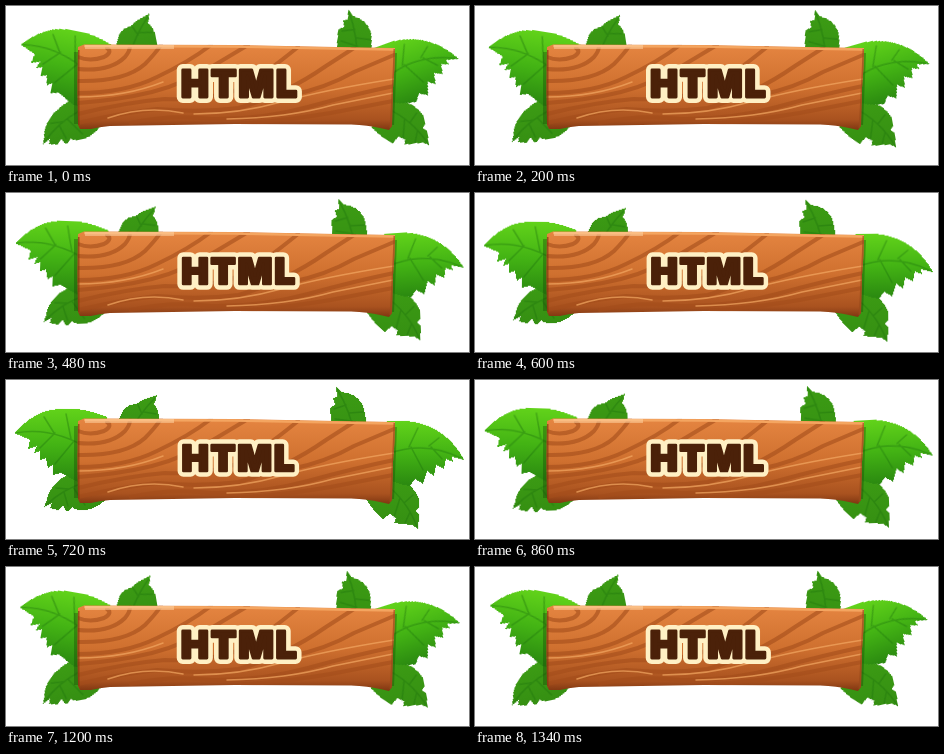
These frames come from a looping animation (463 by 159 pixels, 1360 ms). An HTML page:

```html
<!DOCTYPE html>
<html lang="en">
<head>
<meta charset="utf-8">
<title>HTML sign</title>
<style>
html, body { margin: 0; width: 100%; height: 100%; overflow: hidden; background: #fff; }
svg { display: block; width: 463px; height: 159px; }
.vein { fill: none; stroke: #1d700d; stroke-width: 1.5; stroke-linecap: round; opacity: .4; }
.band, .glow { fill: none; stroke-linecap: round; }
.band { stroke: #a34e1b; stroke-width: 4; opacity: .6; }
.glow { stroke: #f3a863; stroke-width: 1.5; opacity: .7; }
.edge { fill: none; stroke: #173f08; stroke-width: 6; opacity: .35; }
.label { font: 900 37px Inter, "Open Sans", sans-serif; letter-spacing: 2.2px; text-anchor: middle; stroke-linejoin: round; }
</style>
</head>
<body>
<svg viewBox="0 0 463 159">
  <defs>
    <linearGradient id="light" x1="0" y1="0" x2="0" y2="1">
      <stop offset="0" stop-color="#62d31a"/>
      <stop offset=".5" stop-color="#43b314"/>
      <stop offset="1" stop-color="#2a8810"/>
    </linearGradient>
    <linearGradient id="dark" x1="0" y1="0" x2="0" y2="1">
      <stop offset="0" stop-color="#3c9c14"/>
      <stop offset="1" stop-color="#358f12"/>
    </linearGradient>
    <linearGradient id="wood" x1="0" y1="0" x2="0" y2="1">
      <stop offset="0" stop-color="#e58541"/>
      <stop offset=".5" stop-color="#cf702f"/>
      <stop offset=".88" stop-color="#a9521f"/>
      <stop offset="1" stop-color="#7f3611"/>
    </linearGradient>
    <path id="plank" d="M72 41L78 38.5L229 39L330 41L389 42Q389 62 387 82L386 120L383 124L374 122Q362 119 345 118.5L229 118L104 120Q93 121 85 123L74 123L72 119L71.5 80Z"/>
    <clipPath id="face"><use href="#plank"/></clipPath>
  </defs>
  <g id="leaves"></g>
  <path class="edge" d="M71 46V118M388 47L385 119"/>
  <use href="#plank" fill="url(#wood)"/>
  <g clip-path="url(#face)">
    <g class="band">
      <path d="M72 51Q84 56 98 51Q107 46 101 42"/>
      <path d="M72 63Q104 66 119 51Q124 45 124 40"/>
      <path d="M72 75Q119 76 139 58Q149 48 155 39"/>
      <path d="M72 87Q119 87 151 71Q183 56 205 39"/>
      <path d="M72 97Q113 94 146 86Q181 77 212 57L242 39"/>
      <path d="M72 108Q121 96 159 93Q200 95 231 84Q258 69 292 41"/>
      <path d="M72 117Q115 107 151 103Q194 107 233 102Q280 88 320 60L348 42"/>
      <path d="M125 117Q164 108 205 113Q255 114 302 101T388 80"/>
      <path d="M285 89Q320 82 348 66L388 49"/>
      <path d="M235 118Q294 113 335 105L387 95"/>
    </g>
    <g class="glow">
      <path d="M72 91Q119 91 157 76M102 112Q139 99 177 107"/>
      <path d="M188 108Q233 108 275 96Q318 84 388 73"/>
      <path d="M221 113Q281 112 327 99L387 87"/>
    </g>
    <path d="M78 40L229 40.5L330 42.5L389 43.5" fill="none" stroke="#f4a560" stroke-width="2.5"/>
    <path d="M79 41H168" fill="none" stroke="#ffd1a0" stroke-width="4" opacity=".55"/>
    <path d="M72 44V119" fill="none" stroke="#81370f" stroke-width="3" opacity=".7"/>
    <path d="M389 43Q388 75 385 122" fill="none" stroke="#9b4a1c" stroke-width="3" opacity=".7"/>
  </g>
  <g id="title">
    <text class="label" x="234.1" y="91" fill="#fff0c4" stroke="#fff0c4" stroke-width="12">HTML</text>
    <text class="label" x="234.1" y="91" fill="#4b2109" stroke="#4b2109" stroke-width="2.8">HTML</text>
  </g>
</svg>
<script>
const HALF = 680;
// Outlines show the far end of the swing; turn is the angle travelled.
const leaves = [
  { at: [108, 52], turn: 11, tone: "dark",
    edge: "M113 39Q117 28 124 25L130 24L139 19L151 15L150 20L148 24Q153 30 153 40V60H113Z",
    veins: "M124 52Q134 33 149 18M136 34L132 25M138 32L150 34" },
  { at: [352, 68], turn: -11.4, tone: "dark",
    edge: "M330 7L335 12Q350 13 356 24Q360 32 360 46V62H330L325 40L324 28L329 25L327 18L331 17Z",
    veins: "M350 60Q344 30 331 9M340 25L328 29M343 33L357 32M346 41L329 39" },
  { at: [92, 138], turn: 12, tone: "dark",
    edge: "M72 90Q52 98 46 108Q41 115 41 120L38 127L46 123L44 128L52 130L57 125L60 131L63 131L66 127Q72 132 85 129Q95 125 101 118L100 92Z",
    veins: "M80 102Q57 109 40 125M63 109L50 108M58 112L62 126M67 107L79 125" },
  { at: [374, 95], turn: 13, tone: "dark",
    edge: "M380 93Q400 100 408 110Q415 119 413 128L409 131L413 135L412 149L406 145L395 144L388 143L390 138L384 134L377 139L369 132L360 119L370 98Z",
    veins: "M378 103Q401 120 411 147M398 123L407 115M394 118L388 137M404 132L399 143" },
  { at: [85, 78], turn: -11.4, tone: "light",
    edge: "M8 53Q24 36 40 31Q70 24 101 37V60L88 102H72L55 93L47 95V85L42 88L40 78L34 80V71L28 73L31 66L22 69L24 60Z",
    veins: "M88 72Q48 46 10 53M65 59L60 34M48 53L38 37M68 61L49 84M49 53L34 68" },
  { at: [378, 82], turn: 20, tone: "light",
    edge: "M376 42Q400 39 416 44Q444 53 458 80L446 77L447 82L440 79L438 89L430 85L428 96L421 91L417 104L409 99L404 106Q390 104 380 98Z",
    veins: "M382 74Q420 60 456 79M403 67L412 48M423 66L433 58M405 67L417 90M425 67L436 79" }
];

const add = (parent, name, attrs) => {
  const el = document.createElementNS("http://www.w3.org/2000/svg", name);
  for (const key in attrs) el.setAttribute(key, attrs[key]);
  return parent.appendChild(el);
};

const sway = (el, [x, y], from, to) => {
  el.style.transformOrigin = `${x}px ${y}px`;
  el.animate([{ transform: from }, { transform: to }], {
    duration: HALF, iterations: Infinity, direction: "alternate",
    easing: "cubic-bezier(.37,0,.63,1)"
  }).startTime = 0;
};

const layer = document.getElementById("leaves");
for (const { at, turn, tone, edge, veins } of leaves) {
  const g = add(layer, "g", {});
  add(g, "path", { d: edge, fill: `url(#${tone})`, "shape-rendering": "crispEdges" });
  add(g, "path", { d: veins, class: "vein" });
  sway(g, at, `rotate(${-turn}deg)`, "rotate(0deg)");
}
sway(document.getElementById("title"), [200, 77.5], "scale(1)", "scale(.97)");
</script>
</body>
</html>
```
